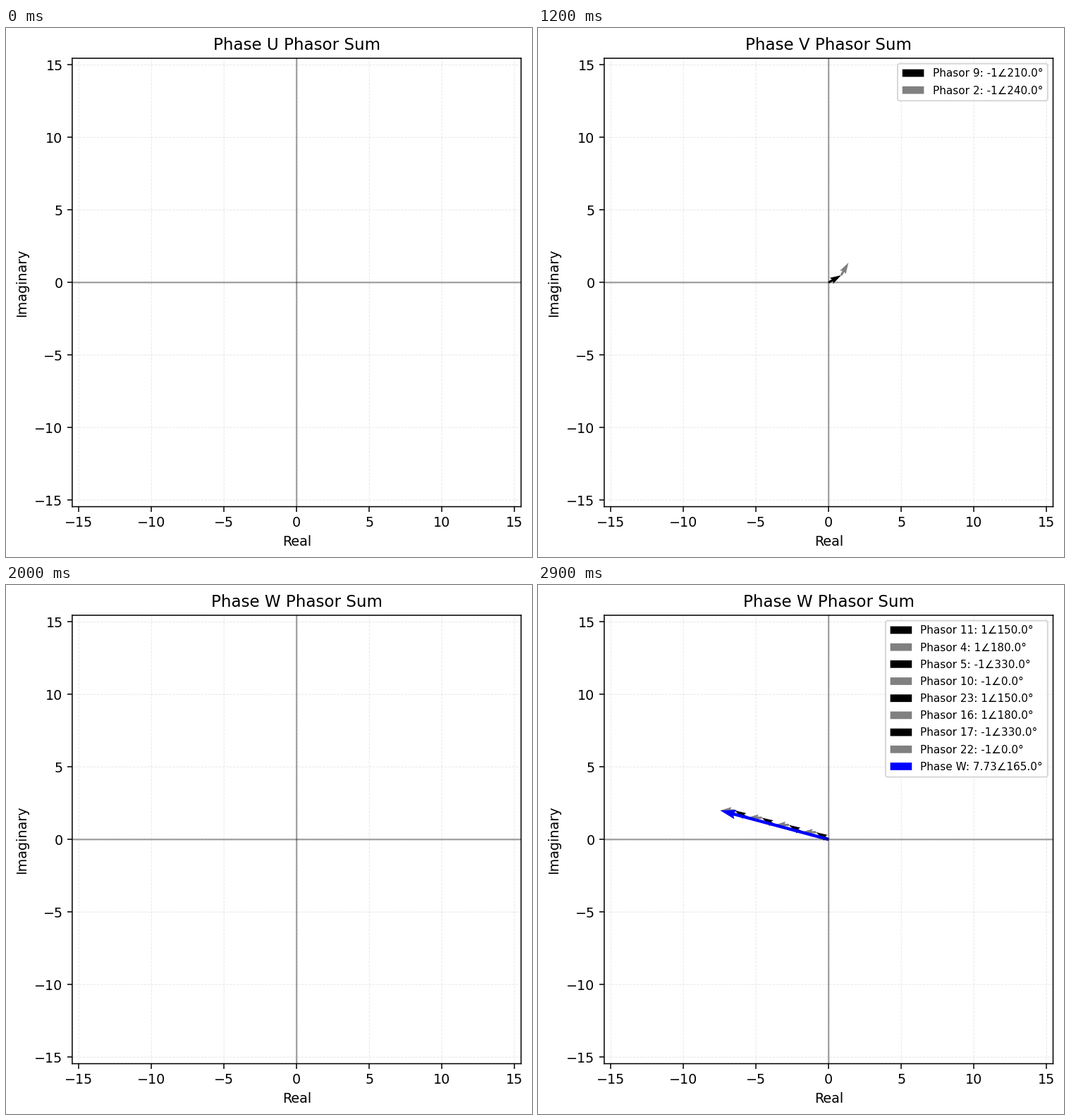
Recreate the animation shown at these times as a matplotlib script. Size 746 by 751 pixels, loop 3 s.

```python
import numpy as np
import matplotlib.pyplot as plt
from matplotlib.animation import FuncAnimation

W, H, DPI = 746, 751, 137.8
STEPS = 10          # empty plot, eight phasors, then their sum
INTERVAL = 100

# name, sum colour, coil numbers of the first half, (sign, angle) pairs
PHASES = [
    ("U", "green", [1, 6, 7, 12], [(-1, 90), (-1, 120), (1, 270), (1, 300)]),
    ("V", "red", [9, 2, 3, 8], [(-1, 210), (-1, 240), (1, 30), (1, 60)]),
    ("W", "blue", [11, 4, 5, 10], [(1, 150), (1, 180), (-1, 330), (-1, 0)]),
]


def phasor(sign, angle):
    return sign * np.exp(1j * np.radians(angle))


LIMIT = 2 * abs(2 * sum(phasor(*p) for p in PHASES[0][3]))

plt.rcParams.update({"font.family": "DejaVu Sans", "path.snap": False})
# tiny margin keeps the pixel size from being truncated
fig = plt.figure(figsize=((W + 0.001) / DPI, (H + 0.001) / DPI), dpi=DPI)
ax = fig.add_axes([93.9 / W, 71.45 / H, 636.6 / W, 636.6 / H])


def arrow(start, vec, color, width, label):
    ax.quiver(start.real, start.imag, vec.real, vec.imag, angles="xy",
              scale_units="xy", scale=1, color=color, width=width, label=label)


def setup(name):
    ax.clear()
    ax.set_xlim(-LIMIT, LIMIT)
    ax.set_ylim(-LIMIT, LIMIT)
    ticks = range(-15, 16, 5)
    ax.set_xticks(ticks)
    ax.set_yticks(ticks)
    ax.grid(True, linestyle="--", linewidth=0.5, alpha=0.3)
    ax.axhline(0, color="black", linewidth=1.2, alpha=0.35)
    ax.axvline(0, color="black", linewidth=1.2, alpha=0.35)
    ax.set_xlabel("Real")
    ax.set_ylabel("Imaginary")
    ax.set_title(f"Phase {name} Phasor Sum")


def draw(frame):
    phase, step = divmod(frame, STEPS)
    name, color, coils, parts = PHASES[phase]
    setup(name)

    total = 0j
    for i in range(min(step, 8)):
        coil = coils[i % 4] + 12 * (i // 4)
        sign, angle = parts[i % 4]
        text = f"{angle}" if coil == 1 else f"{angle:.1f}"
        vec = phasor(sign, angle)
        arrow(total, vec, "gray" if i % 2 else "black", 0.005,
              f"Phasor {coil}: {sign}∠{text}°")
        total += vec

    if step == STEPS - 1:
        angle = np.degrees(np.angle(total))
        arrow(0j, total, color, 0.007,
              f"Phase {name}: {abs(total):.2f}∠{angle:.1f}°")
    if step:
        ax.legend(loc="upper right", fontsize=8, labelspacing=0.6,
                  borderpad=0.44)
    return []


anim = FuncAnimation(fig, draw, frames=len(PHASES) * STEPS, interval=INTERVAL,
                     init_func=lambda: draw(0), repeat=True, repeat_delay=0)
plt.show()
```
